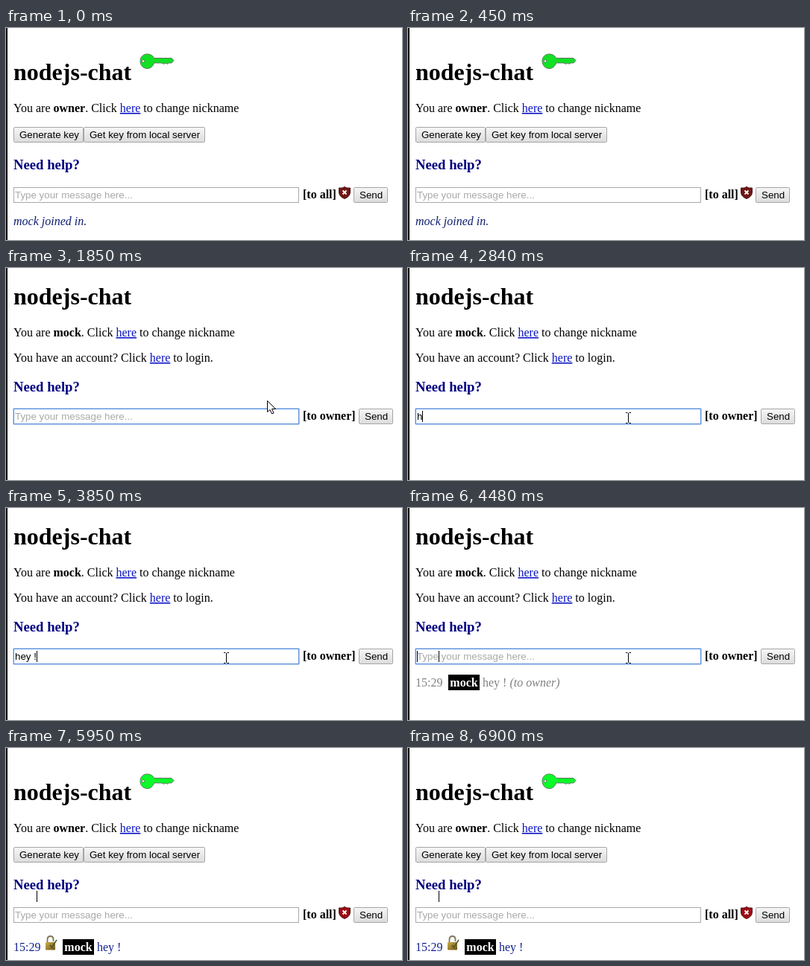
An HTML page for the animation above (7680 ms loop, 531 by 285 pixels).

```html
<!DOCTYPE html>
<html lang="en">
<head>
<meta charset="utf-8">
<title>nodejs-chat</title>
<style>
  html, body { margin: 0; width: 100%; height: 100%; overflow: hidden; background: #fff; }
  svg { display: block; width: 531px; height: 285px; font: 16px "Liberation Serif", "Times New Roman", serif; }
  text { white-space: pre; }
  .ui { font: 13.333px "Liberation Sans", Arial, sans-serif; }
  .b { font-weight: bold; }
  .i { font-style: italic; }
  .h1 { font-size: 32px; font-weight: bold; }
  .h3 { font-size: 18.72px; font-weight: bold; fill: #000080; }
  .link { fill: #0a14c4; text-decoration: underline; }
  .button rect { fill: url(#face); stroke: #a6a6a6; }
</style>
</head>
<body>
<svg viewBox="0 0 531 285">
  <defs>
    <linearGradient id="face" x2="0" y2="1">
      <stop stop-color="#f6f6f6"/><stop offset="1" stop-color="#dcdcdc"/>
    </linearGradient>
    <linearGradient id="brass" x2="1" y2="1">
      <stop stop-color="#cfae4e"/><stop offset="1" stop-color="#6b5218"/>
    </linearGradient>
  </defs>
  <path d="M1 0V285" stroke="#000" stroke-width="2"/>
  <text id="title" class="h1" x="10">nodejs-chat</text>
  <text id="who" x="10">You are <tspan id="nick" class="b"></tspan>. Click <tspan class="link">here</tspan> to change nickname</text>
  <text id="help" class="h3" x="10">Need help?</text>

  <g id="ownerView">
    <path id="key" stroke="#5a7a5c" fill-rule="evenodd"
      d="M198.500 40.500H222L225 43.500L222 47H218L216.500 48.500L214 47L211.500 48.500L209 47H198.500C197 52 193.500 54.500 189.500 54.500C184 54.500 180 50 180 44.500C180 39 184 35 189.500 35C193.500 35 197 37 198.500 40.500ZM182.500 44.500A1.500 2 0 1 0 185.500 44.500A1.500 2 0 1 0 182.500 44.500Z"/>
    <g class="button ui">
      <rect x="10.5" y="133.500" width="93" height="20" rx="1"/><text x="18" y="148">Generate key</text>
      <rect x="104.500" y="133.500" width="162" height="20" rx="1"/><text x="112" y="148">Get key from local server</text>
    </g>
    <text id="joined" class="i" x="10" y="265" fill="#101f70">mock joined in.</text>
  </g>
  <text id="login" x="10" y="126">You have an account? Click <tspan class="link">here</tspan> to login.</text>

  <g id="form">
    <rect x="10.5" y="214.500" width="382" height="20" fill="#fff" stroke="#a9a9a9"/>
    <g id="ring" fill="none">
      <rect x="9.500" y="213.500" width="384" height="22" rx="1.500" stroke="#b4cdf0"/>
      <rect x="10.500" y="214.500" width="382" height="20" stroke="#5f93dc"/>
    </g>
    <text id="hint" class="ui" x="12" y="229" fill="#a9a9a9">Type your message here...</text>
    <text id="typed" class="ui" x="12" y="229"></text>
    <rect id="caret" y="217" width="1" height="15"/>
    <text id="to" class="b" x="398" y="229"></text>
    <g id="shield">
      <path id="shieldFace" d="M454 213.500L457 215H461.500V221Q461 227 454 229.500Q447 227 446.500 221V215H451Z" stroke="#4a1210"/>
      <path d="M451.500 218.500L456.500 223.500M456.500 218.500L451.500 223.500" stroke="#fff" stroke-width="1.800"/>
    </g>
    <g id="send" class="button ui">
      <rect x="466.500" y="214.500" width="45" height="20" rx="1"/><text x="474" y="229">Send</text>
    </g>
  </g>

  <g id="message">
    <text x="10">15:29</text>
    <g id="lock">
      <path d="M55.500 -11V-15.500Q55.500 -20 59.500 -20Q63.500 -20 63.500 -16V-13" fill="none" stroke="#7d7858" stroke-width="1.800"/>
      <rect x="53" y="-12" width="13" height="10.500" rx="1" fill="url(#brass)"/>
      <path d="M59 -8L61.500 -5L68 -15" fill="none" stroke="#4e5521" stroke-width="1.500"/>
    </g>
    <g id="body">
      <rect x="76" y="-16" width="42" height="21" fill="#000"/>
      <text class="b" x="78.300" fill="#fff">mock</text>
      <text x="122">hey !<tspan id="private" class="i"> (to owner)</tspan></text>
    </g>
  </g>
  <rect id="staleCaret" x="41" y="192" width="1" height="15"/>

  <path id="arrow" d="M.5 .5V15.500L4 12.500L6.500 18L9 17L6.500 11.500H11.500Z" fill="#fff" stroke="#000"/>
  <path id="beam" d="M-3 -6.500H-.5M1.500 -6.500H4M.5 -6V7M-3 7.500H-.5M1.500 7.500H4" fill="none" stroke="#000"/>
</svg>
<script>
const LOOP = 7680;
const TYPING = [[2840, "h"], [2920, "he"], [3070, "hey"], [3620, "hey "], [3850, "hey !"], [4480, ""]];
const $ = id => document.getElementById(id);
const show = (id, on) => $(id).setAttribute("display", on ? "inline" : "none");
const move = (id, x, y) => $(id).setAttribute("transform", `translate(${x} ${y})`);
const fill = (id, color) => $(id).setAttribute("fill", color);
const setY = (id, y) => $(id).setAttribute("y", y);
const write = (id, s) => { if ($(id).textContent !== s) $(id).textContent = s; };

// Stepped straight path: returns the point reached after each whole step.
function glide(t, start, step, count, [x0, y0], [x1, y1], first = 0) {
  const k = Math.min(1, (Math.floor((t - start) / step + 1e-6) + first) / count);
  return [Math.round(x0 + (x1 - x0) * k), Math.round(y0 + (y1 - y0) * k)];
}

function pointer(t) {
  const rest = [295, 201];
  if (t < 1620) return null;
  if (t < 5030) return glide(t, 1620, 77.5, 4, [404, 154], rest);
  if (t < 5340) return glide(t, 5030, 77.5, 5, rest, [12, 192], 1);
  if (t < 6270) return null;
  if (t < 6830) return glide(t, 6270, 82, 5, [498, 63], [251, 226]);
  return t < 6900 ? [289, 254] : null;
}

function draw(t) {
  const owner = t < 1230 || t >= 5950, intro = t < 1230;
  const sent = t >= 4480, locked = t >= 4560;

  setY("title", owner ? 70 : 49);
  setY("who", owner ? 113 : 92);
  setY("help", owner ? 190 : 166);
  write("nick", owner ? "owner" : "mock");
  write("to", owner ? "[to all]" : "[to owner]");
  show("ownerView", owner);
  show("joined", intro);
  show("login", !owner);
  show("shield", owner);
  show("ring", !owner);
  move("form", 0, owner ? 0 : -25);
  move("send", owner ? 0 : 7, 0);
  fill("key", intro ? "#12e024" : "#0cfa28");
  fill("shieldFace", intro ? "#701616" : "#9c0d14");

  const text = TYPING.reduce((now, [at, s]) => t >= at ? s : now, "");
  write("typed", text);
  show("hint", !text);
  show("caret", !owner && t >= 2840);
  $("caret").setAttribute("x", 12 + Math.round(text ? $("typed").getComputedTextLength() : 0));
  show("staleCaret", t >= 3850);

  show("message", sent);
  move("message", 0, owner ? 273 : locked ? 248 : 240);
  fill("message", owner ? "#10208c" : "#808080");
  show("lock", locked);
  move("body", locked ? 0 : -22, 0);
  show("private", !owner);

  const at = pointer(t);
  const inField = at && !owner && at[0] < 393 && at[1] > 188;
  show("arrow", at && !inField);
  show("beam", inField);
  if (at) move(inField ? "beam" : "arrow", ...at);
}

let begin;
function tick(now) {
  begin ??= now;
  draw((now - begin) % LOOP);
  requestAnimationFrame(tick);
}
draw(0);
requestAnimationFrame(tick);
</script>
</body>
</html>
```
